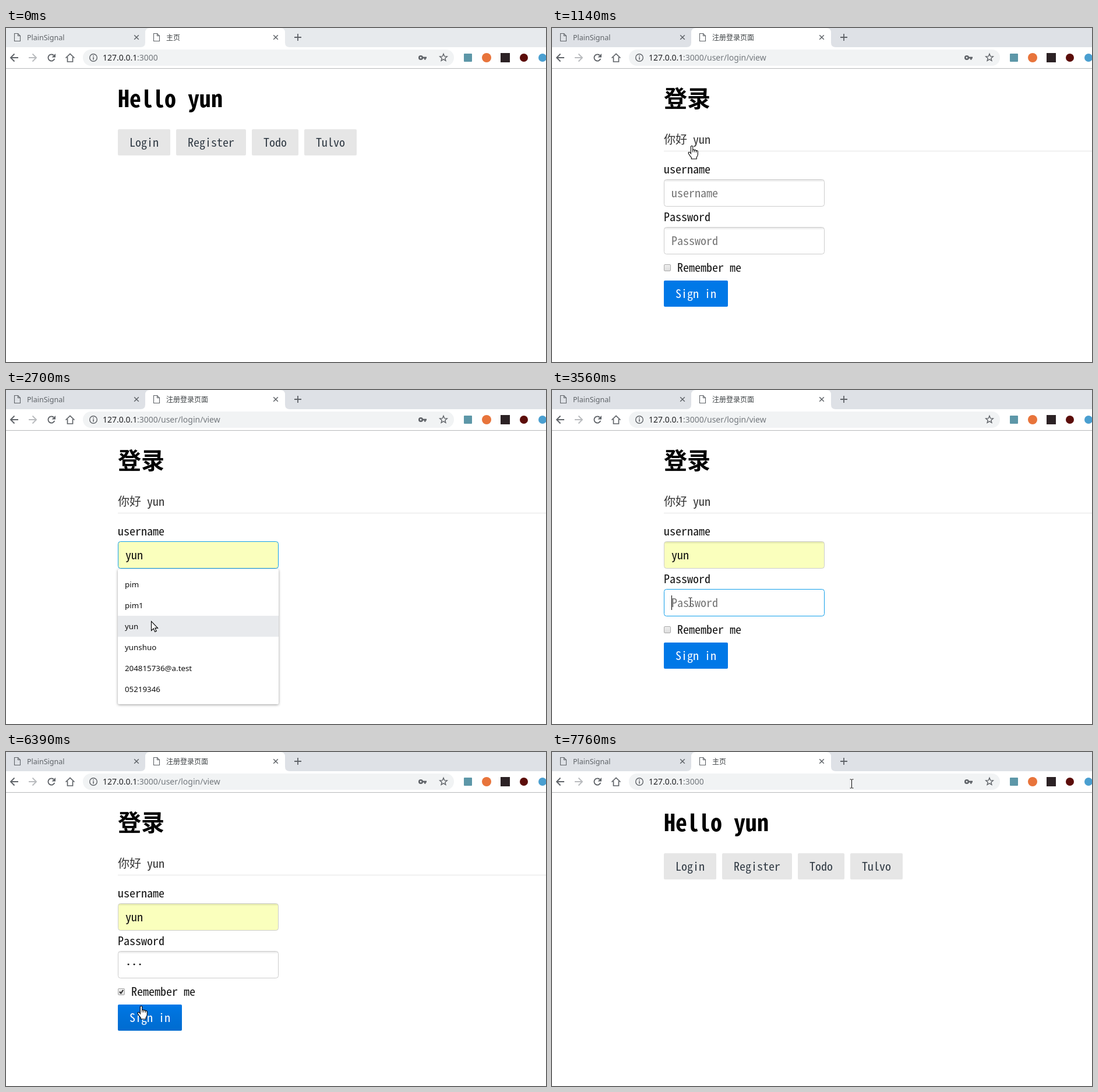
Write an HTML page with a canvas that moves like this. It is 927 by 574 pixels and loops after 8000 ms.

```html
<!DOCTYPE html>
<html lang="zh-CN">
<head>
<meta charset="utf-8">
<title>Login demo</title>
<style>
  html, body { margin: 0; width: 100%; height: 100%; overflow: hidden; background: #fff; }
  canvas { display: block; width: 927px; height: 574px; }
</style>
</head>
<body>
<canvas id="stage" width="927" height="574"></canvas>
<script>
const ctx = document.getElementById('stage').getContext('2d');
const W = 927, H = 574, LOOP = 8000;
const MONO = '"Noto Sans Mono CJK SC", "Noto Sans Mono", monospace';
const UI = '"Noto Sans", "Noto Sans CJK SC", sans-serif';
const USER = 'yun';
const NAMES = ['pim', 'pim1', USER, 'yunshuo', '204815736@a.test', '05219346'];
const LINKS = [['Login', 192, 90], ['Register', 292, 120], ['Todo', 422, 80], ['Tulvo', 512, 90]];
const ICON = '#5f6368';

// Pointer path: time, x, y
const PATH = [
  [120, 322, 560], [400, 290, 400], [850, 240, 202], [1400, 240, 202],
  [1460, 243, 212], [1680, 255, 274], [1800, 255, 274], [1840, 255, 293],
  [2080, 255, 293], [2300, 253, 345], [2550, 249, 397], [2940, 249, 397],
  [3240, 243, 375], [3400, 243, 375], [3560, 237, 364], [3720, 237, 364],
  [3880, 236, 354], [4040, 236, 354], [4100, 241, 355], [4260, 241, 355],
  [4340, 236, 366], [4500, 236, 366], [4590, 235, 352], [5200, 235, 352],
  [5600, 215, 395], [5850, 203, 418], [5980, 200, 413], [6230, 200, 413],
  [6390, 232, 436], [6690, 235, 447], [7470, 235, 447], [7600, 248, 230],
  [7760, 514, 54]
];

function pointerAt(t) {
  if (t < PATH[0][0]) return null;
  const i = PATH.findIndex(k => k[0] > t);
  if (i < 0) return PATH[PATH.length - 1].slice(1);
  const [a, ax, ay] = PATH[i - 1], [b, bx, by] = PATH[i];
  const f = (t - a) / (b - a);
  return [ax + (bx - ax) * f, ay + (by - ay) * f];
}

const between = (t, a, b) => t >= a && t < b;
const inside = (p, x, y, w, h) => p && p[0] >= x && p[0] < x + w && p[1] >= y && p[1] < y + h;

function rect(x, y, w, h, fill) {
  ctx.fillStyle = fill;
  ctx.fillRect(x, y, w, h);
}

function round(x, y, w, h, r, fill, line) {
  ctx.beginPath();
  ctx.roundRect(x, y, w, h, r);
  if (fill) { ctx.fillStyle = fill; ctx.fill(); }
  if (line) { ctx.strokeStyle = line; ctx.lineWidth = 1; ctx.stroke(); }
}

function disc(x, y, r, fill) {
  ctx.beginPath();
  ctx.arc(x, y, r, 0, 7);
  ctx.fillStyle = fill;
  ctx.fill();
}

function stroke(d, color, width = 1) {
  ctx.strokeStyle = color;
  ctx.lineWidth = width;
  ctx.stroke(new Path2D(d));
}

function fillPath(d, color) {
  ctx.fillStyle = color;
  ctx.fill(new Path2D(d));
}

function label(s, x, y, size, color, weight = '') {
  ctx.font = `${weight} ${size}px ${UI}`;
  ctx.letterSpacing = '0px';
  ctx.fillStyle = color;
  ctx.fillText(s, x, y);
}

// Half-em monospaced text
function mono(s, x, y, color, size = 20, weight = '') {
  ctx.font = `${weight} ${size}px ${MONO}`;
  ctx.letterSpacing = '0px';
  ctx.letterSpacing = `${size / 2 - ctx.measureText('0').width}px`;
  ctx.fillStyle = color;
  ctx.fillText(s, x, y);
  ctx.letterSpacing = '0px';
}

function cross(x, y, r, color, width) {
  stroke(`M${x - r} ${y - r}L${x + r} ${y + r}M${x + r} ${y - r}L${x - r} ${y + r}`, color, width);
}

function docIcon(x) {
  stroke(`M${x + .5} 9.5h6l4 4v9h-10zM${x + 6.5} 9.5v4h4`, ICON, 1.1);
}

function star(x, y) {
  ctx.beginPath();
  for (let i = 0; i < 10; i++) {
    const a = -Math.PI / 2 + i * Math.PI / 5, r = i % 2 ? 2.9 : 6.6;
    ctx.lineTo(x + r * Math.cos(a), y + r * Math.sin(a));
  }
  ctx.closePath();
  ctx.strokeStyle = ICON;
  ctx.lineWidth = 1.4;
  ctx.stroke();
}

function reloadIcon() {
  ctx.beginPath();
  ctx.arc(78, 51, 5.6, .35, 5.45);
  ctx.strokeStyle = ICON;
  ctx.lineWidth = 1.9;
  ctx.stroke();
  fillPath('M85 44v6.5h-6.5z', ICON);
}

function tabs(t, title, loading) {
  rect(0, 0, W, 33, t < 900 ? '#e7eaed' : '#dee1e6');
  fillPath('M231 33Q239 33 239 25V8Q239 0 247 0H471Q479 0 479 8V25Q479 33 487 33Z', '#fff');
  docIcon(14);
  label('PlainSignal', 36, 21, 12.5, '#5f6368');
  cross(224, 16, 3.8, ICON, 1.5);
  if (loading) {
    ctx.beginPath();
    ctx.arc(259, 16, 6, 2.2, 5.8);
    ctx.strokeStyle = '#80868b';
    ctx.lineWidth = 1.6;
    ctx.stroke();
  } else docIcon(253);
  label(title, 275, 21, 12, '#3c4043');
  cross(463, 16, 3.8, ICON, 1.5);
  stroke('M495 16H507M501 10V22', ICON, 1.8);
}

function toolbar(t, path, loading) {
  rect(0, 33, W, 36, '#fff');
  rect(0, 69, W, 1, '#b6b8ba');
  stroke('M21 51H8.5M14.5 44.5L8 51L14.5 57.5', ICON, 1.9);
  stroke('M39 51H51.5M45.5 44.5L52 51L45.5 57.5', '#b9bbbe', 1.9);
  if (loading) cross(78, 51, 5, ICON, 1.9);
  else reloadIcon();
  stroke('M102.5 51.5L110 44.5L117.5 51.5M105.5 50V58H114.5V50', ICON, 1.7);

  round(132, 37, 637, 28, 14, '#f1f3f4');
  ctx.beginPath();
  ctx.arc(150, 51, 6.3, 0, 7);
  ctx.strokeStyle = ICON;
  ctx.lineWidth = 1.4;
  ctx.stroke();
  rect(149.2, 50, 1.6, 4.5, ICON);
  rect(149.2, 47.2, 1.6, 1.6, ICON);
  label('127.0.0.1', 166, 56, 14, '#202124');
  label(':3000' + path, 225, 56, 14, '#74797e');

  if (!between(t, 3100, 4800)) {
    disc(712, 51, 4, ICON);
    rect(714, 49.6, 8, 2.8, ICON);
    rect(718, 51, 2.6, 3.6, ICON);
    disc(712, 51, 1.4, '#f1f3f4');
  }
  star(751, 51);
  round(786, 44, 14, 14, 1, '#5d97a8');
  disc(825, 51, 8, '#e8743b');
  rect(849, 43, 16, 16, '#2c2225');
  disc(889, 51, 7, '#5c0d0a');
  disc(921, 51, 7, '#4a9fd0');
}

function button(x, y, w, fill, text, color, hover) {
  round(x, y, w, 45, 2, fill);
  if (hover) {
    const g = ctx.createLinearGradient(0, y, 0, y + 45);
    g.addColorStop(0, 'rgba(0,0,0,0)');
    g.addColorStop(.4, 'rgba(0,0,0,.05)');
    g.addColorStop(1, 'rgba(0,0,0,.1)');
    round(x, y, w, 45, 2, g);
  }
  mono(text, x + 20, y + 30, color);
}

function home(p) {
  mono('Hello ' + USER, 192, 136, '#000', 40, 'bold');
  for (const [text, x, w] of LINKS)
    button(x, 174, w, '#e6e6e6', text, '#303a44', inside(p, x, 174, w, 45));
}

function field(y, focus, fill) {
  round(192.5, y + .5, 275, 46, 4, fill);
  if (!focus) {
    const g = ctx.createLinearGradient(0, y, 0, y + 5);
    g.addColorStop(0, 'rgba(0,0,0,.13)');
    g.addColorStop(1, 'rgba(0,0,0,0)');
    round(193, y + 1, 274, 5, [4, 4, 0, 0], g);
  }
  round(192.5, y + .5, 275, 46, 4, null, focus ? '#129fea' : '#ccc');
}

function checkbox(on) {
  const g = ctx.createLinearGradient(0, 406, 0, 418);
  g.addColorStop(0, '#efefef');
  g.addColorStop(1, '#dcdcdc');
  round(192.5, 406.5, 11, 11, 1.5, g, '#a9a9a9');
  if (on) stroke('M195 412L197.3 414.6L201.2 409', '#333', 2.1);
}

function suggestions(row) {
  ctx.save();
  ctx.shadowColor = 'rgba(0,0,0,.4)';
  ctx.shadowBlur = 4;
  ctx.shadowOffsetY = 1;
  round(192, 308, 276, 232, 2, '#fff');
  ctx.restore();
  if (row >= 0) rect(192, 316 + row * 36, 276, 36, '#e8eaed');
  NAMES.forEach((s, i) => label(s, 204, 339 + i * 36, 13.33, '#111'));
}

function login(t, p) {
  label('登录', 192, 136, 40, '#000', 'bold');
  label('你好', 192, 199, 20, '#333');
  mono(USER, 242, 199, '#333');
  rect(192, 211, 735, 1, '#e5e5e5');

  const open = between(t, 1840, 2940);
  const row = open && p[1] >= 316 ? Math.floor((p[1] - 316) / 36) : -1;
  const name = t >= 2940 ? USER : NAMES[row];
  mono('username', 192, 250, '#111');
  field(260, between(t, 1840, 3480), name ? '#faffbd' : '#fff');
  mono(name || 'username', 205, 291, name ? '#111' : '#757575');
  if (between(t, 1840, 2700)) rect(205, 271, 1, 25, '#000');

  const typing = between(t, 3480, 6230);
  const dots = [4780, 5040, 5200].filter(k => t >= k).length;
  mono('Password', 192, 332, '#111');
  field(342, typing, '#fff');
  if (!dots) mono('Password', 205, 373, '#757575');
  for (let i = 0; i < dots; i++) round(208.8 + i * 10, 363.7, 2.6, 2.6, .6, '#111');
  if (typing && !between(t, 4040, 4550) && !between(t, 5700, 6230))
    rect(205 + dots * 10, 353, 1, 25, '#000');

  checkbox(t >= 6230);
  mono('Remember me', 215, 419, '#111');
  button(192, 434, 110, '#0078e7', 'Sign in', '#fff', !open && inside(p, 192, 434, 110, 45));
  if (open) suggestions(row);
}

const ARROW = 'M.5 .5V16.5L4.2 13L6.7 18.6L9.2 17.5L6.8 12.1H11.6Z';
const HAND = 'M-1.6 1.6Q0 -.6 1.7 1.6V7.6Q3.3 6.2 4.6 8Q6.3 6.8 7.5 8.8Q9.6 8 10.3 10.4V15.5Q10 18.5 8.2 20.2V23H-.7V20.6Q-3 18.5-5.6 13.8Q-6.4 11.4-4.5 11.2Q-3 11.3-1.6 13.7Z';
const BEAM = 'M-3 -7.5H-.8L0 -7L.8 -7.5H3M0 -7V7M-3 7.5H-.8L0 7L.8 7.5H3';

function pointer(p, t, onHome) {
  if (!p) return;
  const [x, y] = p.map(Math.round);
  const open = between(t, 1840, 2940);
  const overLink = onHome
    ? LINKS.some(([, bx, w]) => inside(p, bx, 174, w, 45))
    : inside(p, 192, 434, 110, 45) || between(t, 1060, 1220);
  const overText = inside(p, 132, 37, 637, 28) || !onHome &&
    (inside(p, 192, 260, 276, 47) || !open && inside(p, 192, 342, 276, 47));
  ctx.save();
  ctx.translate(x, y);
  if (overText) {
    ctx.translate(.5, .5);
    stroke(BEAM, '#fff', 2.4);
    stroke(BEAM, '#000');
  } else {
    const shape = overLink ? HAND : ARROW;
    fillPath(shape, '#fff');
    stroke(shape, '#000', 1.1);
    if (overLink) stroke('M1.7 7.6V11.5M4.6 8V11.5M7.5 8.8V11.8', '#000');
  }
  ctx.restore();
}

function draw(t) {
  const onHome = t < 1060 || t >= 7470;
  const loading = between(t, 980, 1060) || between(t, 6850, 7470);
  const p = pointerAt(t);
  rect(0, 0, W, H, '#fff');
  tabs(t, onHome ? '主页' : '注册登录页面', loading);
  toolbar(t, onHome ? '' : '/user/login/view', loading);
  if (onHome) home(p);
  else login(t, p);
  pointer(p, t, onHome);
}

const start = performance.now();
function tick() {
  draw((performance.now() - start) % LOOP);
  requestAnimationFrame(tick);
}
tick();
</script>
</body>
</html>
```
